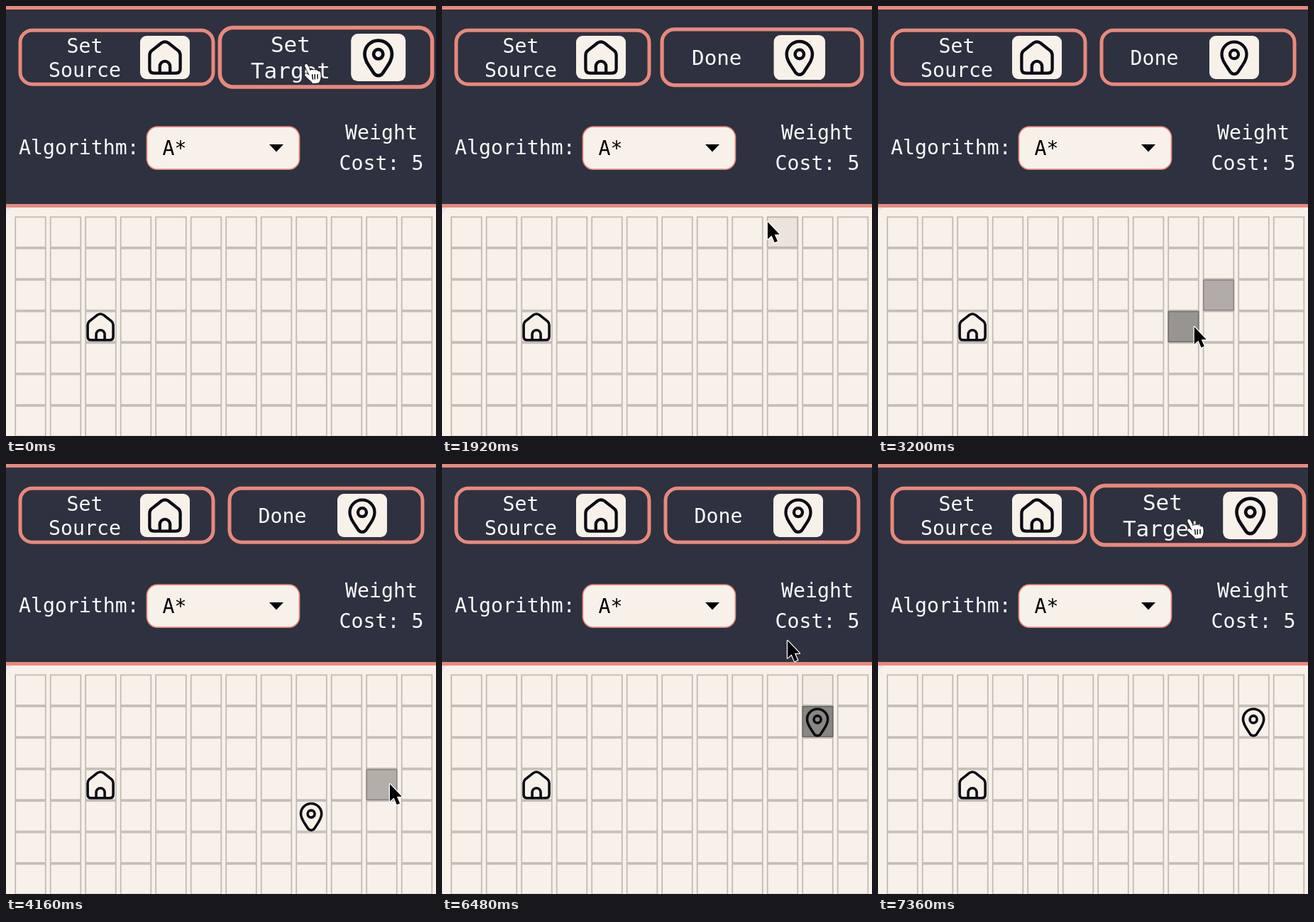
An HTML page with a canvas that plays this animation: 606 by 606 pixels, repeating every 7.44 s.

```html
<!DOCTYPE html>
<html lang="en">
<head>
<meta charset="utf-8">
<title>Pathfinding grid</title>
<style>
  html, body { margin: 0; width: 100%; height: 100%; overflow: hidden; background: #f8f1ea; }
  canvas { display: block; width: 606px; height: 606px; }
</style>
</head>
<body>
<canvas id="stage" width="606" height="606"></canvas>
<script>
const ctx = document.getElementById('stage').getContext('2d');
const LOOP = 7440, STEP = 80, SAMPLE = 10;
const NAVY = '#2e313f', CORAL = '#e8897c', CREAM = '#f8f1ea', INK = '#0b0c14', LINE = '#c1bbb4';
const COLS = 12, ROWS = 7, CELL = 44.4, PITCH = 49.5, GRID_X = 12.3, GRID_Y = 296.5;
const TARGET_BUTTON = [312, 30, 278, 84];

// Eased pointer moves: depart, arrive, x, y
const home0 = [424, 81];
const moves = [
  [0, 240, 435, 83],
  [1700, 2000, 464, 350],
  [2060, 2320, 470, 396],
  [2880, 3440, 430, 487],
  [3840, 3960, 504.5, 478],
  [4100, 4160, 541, 450],
  [4200, 4400, 576, 488],
  [4440, 4640, 574, 436],
  [5150, 5280, 554, 405],
  [5280, 5840, 540, 367],
  [6440, 6480, 487, 248],
  [6480, 7120, 439, 77]
];
const EDIT = 1040, FINISH = 7200, clicks = [3600, 4800, 5840];

const house = new Path2D('M-18-3Q-18-6-16-8L-4-17.5Q0-20 4-17.5L16-8Q18-6 18-3V13Q18 18 13 18H-13Q-18 18-18 13ZM-6 18V10A6 6 0 0 1 6 10V18');
const pin = new Path2D('M0 19Q-3 19-5 16C-10 8-14.6 3-14.6-4A14.6 14.6 0 0 1 14.6-4C14.6 3 10 8 5 16Q3 19 0 19ZM5-4A5 5 0 1 1-5-4A5 5 0 1 1 5-4Z');
const arrow = new Path2D('M0 0V26L6 20.5L10.5 31L15 29L10.5 19H18Z');
const hand = new Path2D('M-3 3Q-3-1 0 0Q2 1 5 10Q7 7 9 9Q11 7 13 9Q16 8 17 11Q20 10 20.5 13L21 19Q21 23 18 28L9 29Q6 25 1 21L-3 17Q-3 13 0 14L4 17Z');
const fingers = new Path2D('M8 15L9 23M12 15V23M16 15V22');

const smooth = k => k * k * (3 - 2 * k);
const inside = ([px, py], x, y, w, h) => px >= x && px < x + w && py >= y && py < y + h;

function pointer(t) {
  let [x, y] = home0;
  for (const [depart, arrive, toX, toY] of moves) {
    if (t <= depart) break;
    const k = smooth(Math.min(1, (t - depart) / (arrive - depart)));
    x += (toX - x) * k;
    y += (toY - y) * k;
  }
  return [x, y];
}

// Hover amount of an area, with separate rise and fall times
function hover(trail, area, rise, fall) {
  let amount = inside(trail[0], ...area) ? 1 : 0;
  for (const point of trail)
    amount = inside(point, ...area) ? Math.min(1, amount + SAMPLE / rise) : Math.max(0, amount - SAMPLE / fall);
  return amount;
}

function panel(x, y, w, h, r, fill, stroke, width) {
  ctx.beginPath();
  ctx.roundRect(x, y, w, h, r);
  if (fill) { ctx.fillStyle = fill; ctx.fill(); }
  if (stroke) { ctx.strokeStyle = stroke; ctx.lineWidth = width; ctx.stroke(); }
}

function text(str, x, y, align = 'center', color = '#fbfbfb') {
  ctx.font = '28.2px "DejaVu Sans Mono", monospace';
  ctx.textAlign = align;
  ctx.fillStyle = color;
  ctx.fillText(str, x, y);
}

function icon(path, x, y, scale) {
  ctx.save();
  ctx.translate(x, y);
  ctx.scale(scale, scale);
  ctx.lineJoin = ctx.lineCap = 'round';
  ctx.strokeStyle = INK;
  ctx.lineWidth = 3.6;
  ctx.stroke(path);
  ctx.restore();
}

function button(cx, label, textX, path, iconX) {
  panel(cx - 136, 34.2, 272, 76, 17, null, CORAL, 5);
  const lines = label.split(' ');
  const top = lines.length > 1 ? 66 : 82.5;
  lines.forEach((line, i) => text(line, textX, top + i * 33.5));
  panel(iconX - 35, 42, 70, 61, 9, CREAM);
  icon(path, iconX, 73, 1.2);
}

function header(t, grow) {
  ctx.fillStyle = CORAL;
  ctx.fillRect(0, 0, 606, 284);
  ctx.fillStyle = NAVY;
  ctx.fillRect(0, 5, 606, 274);
  button(156, 'Set Source', 111, house, 224);

  const scale = 1 + 0.1 * grow;
  ctx.save();
  ctx.translate(451, 72);
  ctx.scale(scale, scale);
  ctx.translate(-451, -72);
  if (t >= EDIT && t < FINISH) button(451, 'Done', 389.5, pin, 502);
  else button(451, 'Set Target', 405.5, pin, 518);
  ctx.restore();

  text('Algorithm:', 18, 209, 'left');
  panel(198.5, 170.2, 215, 60, 15, CREAM, CORAL, 1.7);
  text('A*', 220.6, 210, 'left', '#000');
  ctx.beginPath();
  ctx.moveTo(371, 195);
  ctx.lineTo(391, 195);
  ctx.lineTo(381, 205.5);
  ctx.fill();
  text('Weight', 529, 188);
  text('Cost: 5', 529, 231);
}

function grid(t, trail) {
  ctx.fillStyle = '#e6e4ec';
  ctx.fillRect(0, 284, 12, 12);
  panel(0, 284, 640, 340, 12, CREAM);
  for (let c = 0; c < COLS; c++) for (let r = 0; r < ROWS; r++) {
    const x = GRID_X + c * PITCH, y = GRID_Y + r * CELL;
    ctx.strokeStyle = LINE;
    ctx.lineWidth = 1.8;
    ctx.strokeRect(x + 0.9, y + 0.9, CELL - 1.8, CELL - 1.8);
    ctx.fillStyle = `rgba(0,0,0,${hover(trail, [x, y, CELL, CELL], 90, 280) / 2})`;
    ctx.fillRect(x, y, CELL, CELL);
  }
  const place = (path, c, r) => icon(path, GRID_X + c * PITCH + 21.8, GRID_Y + r * CELL + 23, 1);
  place(house, 2, 3);
  const click = clicks.findLast(time => time <= t);
  if (click) {
    const [x, y] = pointer(click);
    place(pin, Math.floor((x - GRID_X) / PITCH), Math.floor((y - GRID_Y) / CELL));
  }
}

function cursor([x, y], pointing) {
  const shape = pointing ? hand : arrow;
  ctx.save();
  ctx.translate(x, y + 1);
  ctx.scale(0.94, 0.94);
  ctx.lineJoin = 'round';
  ctx.fillStyle = pointing ? '#fff' : '#000';
  ctx.strokeStyle = pointing ? '#111' : '#fff';
  ctx.lineWidth = pointing ? 1.6 : 2.6;
  ctx.stroke(shape);
  ctx.fill(shape);
  if (pointing) ctx.stroke(fingers);
  ctx.restore();
}

function draw(now) {
  const t = Math.floor(now % LOOP / STEP) * STEP;
  const trail = Array.from({ length: 71 }, (_, i) => pointer(t - (70 - i) * SAMPLE));
  const tip = pointer(t);
  header(t, hover(trail, TARGET_BUTTON, 250, 250));
  grid(t, trail);
  cursor(tip, inside(tip, ...TARGET_BUTTON));
}

const start = performance.now();
function tick() {
  draw(performance.now() - start);
  requestAnimationFrame(tick);
}
tick();
</script>
</body>
</html>
```
